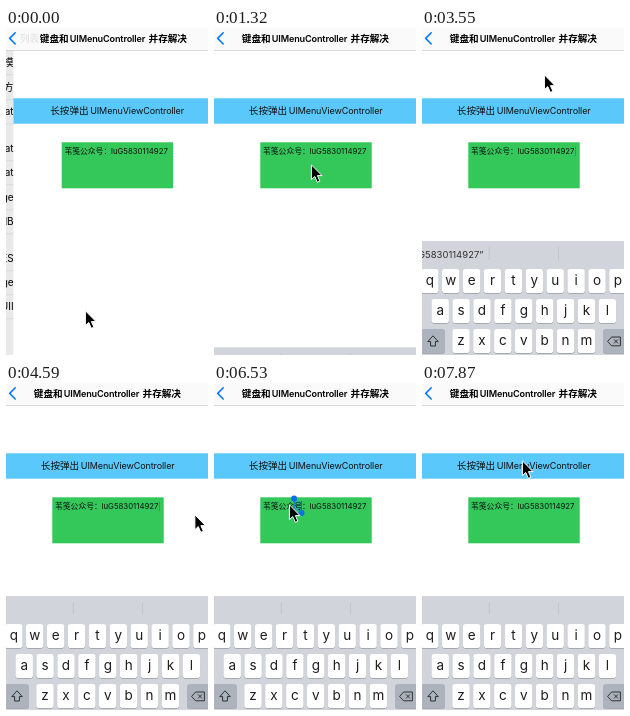
These frames come from a looping animation (202 px wide and 327 px high, 8000 ms). An HTML page:

```html
<!DOCTYPE html>
<html lang="zh">
<head>
<meta charset="utf-8">
<title>键盘和UIMenuController并存解决</title>
<style>
  html, body { margin: 0; width: 100%; height: 100%; overflow: hidden; background: #fff; }
  svg { display: block; width: 100vw; height: 100vh; }
  text { font-family: Inter, "Noto Sans CJK SC", "Noto Sans CJK", sans-serif; fill: #000; }
  .title { font-weight: 600; font-size: 9.6px; }
  .title .latin { font-size: 9.1px; letter-spacing: -.15px; }
  .bar { font-size: 9.6px; fill: #111; }
  .bar .latin { font-size: 9px; letter-spacing: -.1px; }
  .note { font-size: 7.8px; fill: #111; }
  .list { font-size: 10px; text-anchor: end; }
  .hint { font-size: 9.5px; text-anchor: end; fill: #333; }
  .key { font-size: 13.5px; text-anchor: middle; fill: #1c1c1c; }
</style>
</head>
<body>
<svg viewBox="0 0 202 327" preserveAspectRatio="none">
  <rect width="202" height="327" fill="#fff"/>

  <g id="list">
    <rect width="20" height="327" fill="#e9e9ea"/>
  </g>

  <g id="page">
    <rect x="-2" y="22" width="206" height="305" fill="#fff"/>
    <rect x="-2" y="70.3" width="206" height="25.4" fill="#5ac8fa"/>
    <text class="bar" y="86.4"><tspan x="34.8">长按弹出</tspan><tspan class="latin" x="74.8">UIMenuViewController</tspan></text>
    <rect x="46.3" y="114.3" width="111.4" height="46" fill="#34c759"/>
    <rect id="range" x="80" y="118" width="7.6" height="10" fill="#007aff" opacity=".25"/>
    <text class="note" y="126.2"><tspan x="49">苇笺公众号：</tspan><tspan x="95.6">luG5830114927</tspan></text>
    <rect id="caret" x="153.2" y="118.5" width=".8" height="9.5" fill="#2d6fd0" opacity=".8"/>
    <g id="grips" fill="#0a6fe8">
      <rect x="79.6" y="116" width="1" height="12"/>
      <rect x="87" y="118" width="1" height="12"/>
      <circle cx="80.1" cy="115.6" r="3"/>
      <circle cx="87.5" cy="130" r="3"/>
    </g>
  </g>

  <rect width="202" height="22" fill="#fafafa"/>
  <rect y="22" width="202" height=".6" fill="#c4c4c6"/>
  <text id="ghost" class="title" x="14" y="14" opacity=".07">列表</text>
  <text id="title" class="title" y="13.8"><tspan x="27.8">键盘和</tspan><tspan class="latin" x="57.8">UIMenuController</tspan><tspan x="136.6">并存解决</tspan></text>
  <path d="M9.2 4.8 3.7 10.4 9.2 16" fill="none" stroke="#007aff" stroke-width="1.6" stroke-linecap="round" stroke-linejoin="round"/>

  <g id="board">
    <rect y="213" width="202" height="114" fill="#d1d4da"/>
    <path d="M67.3 219v13M136.5 219v13" stroke="#bcc0c7" stroke-width=".7"/>
    <text id="hint" class="hint" x="61.5" y="229.8">luG5830114927”</text>
    <g id="keys"></g>
    <path d="M11 307.8 5.8 313.6H8.6V318H13.4V313.6H16.2Z" fill="none" stroke="#222" stroke-width=".9" stroke-linejoin="round"/>
    <path d="M185.6 313.4 189.6 309H198.4V317.8H189.6ZM192 311.4 196 315.4M196 311.4 192 315.4" fill="none" stroke="#222" stroke-width=".9" stroke-linejoin="round"/>
  </g>

  <path id="pointer" d="M0 0V14.8L3.4 11.7 5.9 17.5 8.5 16.4 6 10.8H10.6Z" fill="#000" stroke="#fff" stroke-width="1" stroke-linejoin="round"/>
</svg>

<script>
const LOOP = 8000, TICK = 148.5, TICKS = 54;
const NS = 'http://www.w3.org/2000/svg';
const $ = id => document.getElementById(id);

function add(parent, tag, attrs, label = '') {
  const el = document.createElementNS(NS, tag);
  for (const name in attrs) el.setAttribute(name, attrs[name]);
  el.textContent = label;
  parent.append(el);
}

function addKey(x, y, width, fill) {
  add($('keys'), 'rect', { x, y: y + .8, width, height: 24, rx: 2.8, fill: '#989ba1' });
  add($('keys'), 'rect', { x, y, width, height: 24, rx: 2.8, fill });
}

[['qwertyuiop', 7.8], ['asdfghjkl', 18.2], ['zxcvbnm', 39]].forEach(([letters, left], row) => {
  const y = 241 + row * 30;
  [...letters].forEach((letter, i) => {
    const x = left + i * 20.9;
    addKey(x - 8.7, y, 17.4, '#fff');
    add($('keys'), 'text', { class: 'key', x, y: y + 16.2 }, letter);
  });
});
addKey(-1, 301, 24, '#adb3bd');
addKey(181, 301, 24, '#adb3bd');

[['夜亮模', 38], ['第三方', 63], ['Dat', 87], ['Dat', 124], ['Dat', 148], ['Page', 173],
 ['ToolB', 197], ['RES', 234], ['Page ', 258], ['UII', 282]].forEach(([label, y]) => {
  add($('list'), 'text', { class: 'list', x: 7.6, y }, label);
  add($('list'), 'rect', { y: y + 8.6, width: 8, height: .5, fill: '#c9c9cc' });
});

// Pointer tip: time, x, y
const path = [
  [0, 79, 282], [300, 79, 282], [890, 97, 136], [1480, 97, 136],
  [1920, 123, 114], [2220, 123, 108], [2700, 78, 252], [2900, 82, 248],
  [3400, 123, 50], [3550, 122, 46], [3850, 124, 54], [4450, 189, 130],
  [4750, 188, 132], [5350, 78, 118], [5640, 78, 118], [5900, 75, 121],
  [6680, 75, 121], [7350, 14, 86], [7440, 14, 86], [7600, 134, 106], [7870, 100, 77]
];
const slide = [[0, 1], [150, .3], [300, 0]];
const rise = [[1320, 114], [1480, 40], [1620, 6], [1770, 0]];

const smooth = k => k * k * (3 - 2 * k);

function sample(keys, t, ease = k => k) {
  const next = keys.findIndex(key => key[0] > t);
  if (next < 0) return keys[keys.length - 1].slice(1);
  if (next === 0) return keys[0].slice(1);
  const a = keys[next - 1], b = keys[next];
  const k = ease((t - a[0]) / (b[0] - a[0]));
  return a.slice(1).map((v, i) => v + (b[i + 1] - v) * k);
}

const move = (id, x, y = 0) => $(id).setAttribute('transform', `translate(${x} ${y})`);
const show = (id, on) => { $(id).style.display = on ? '' : 'none'; };

function draw(t) {
  const [push] = sample(slide, t);
  move('page', 9.4 * push);
  move('title', 6 * push);
  move('list', -3 * (1 - push));
  show('list', push > 0);
  show('ghost', push > 0);

  const [drop] = sample(rise, t);
  move('board', 0, drop);
  show('board', drop < 114);
  show('hint', t < 4400);

  const picked = t > 6350 && t < 7250;
  const blink = (t + 700) % 1000 < 500;
  show('range', picked);
  show('grips', picked);
  show('caret', t > 1400 && !picked && blink);

  const [x, y] = sample(path, t, smooth);
  move('pointer', x + .4, y + .8);
}

// The picture advances in even ticks
function frame(now) {
  const tick = Math.floor((now % LOOP + 20) / TICK);
  draw(Math.min(tick, TICKS - 1) * TICK);
  requestAnimationFrame(frame);
}
draw(0);
requestAnimationFrame(frame);
</script>
</body>
</html>
```
